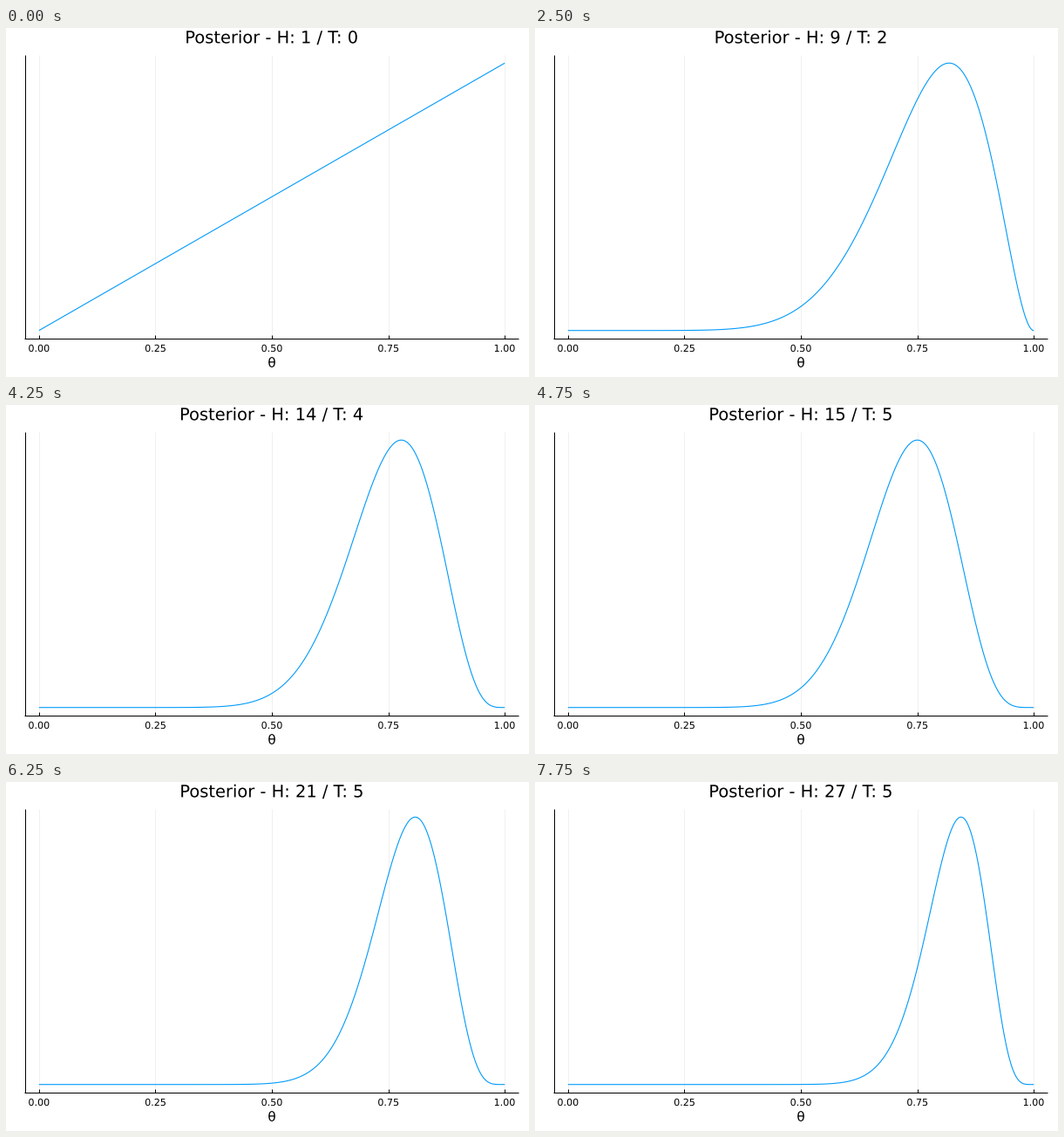
Write a matplotlib script that moves like this. It is 600 by 400 pixels and loops after 8000 ms.

```python
import numpy as np
import matplotlib.pyplot as plt
from matplotlib.animation import FuncAnimation
from matplotlib.patches import PathPatch
from matplotlib.textpath import TextPath
from matplotlib.transforms import Affine2D

W, H, DPI = 600, 400, 100
STEP_MS = 250
TOSSES = 32
TAILS = {8, 9, 15, 17, 20}  # toss numbers that land on tails

LEFT, RIGHT, TOP, BOTTOM = 21.5, 588, 31, 355.5
X0, X1 = 37.8, 572.2        # theta = 0 and theta = 1
Y0, Y1 = 346.7, 40.2        # density 0 and peak density

plt.rcParams["path.simplify"] = False
fig = plt.figure(figsize=(W / DPI, H / DPI), dpi=DPI, facecolor="white")
ax = fig.add_axes([0, 0, 1, 1])
ax.set(xlim=(0, W), ylim=(H, 0))
ax.axis("off")


def stroke(xs, ys, color="black", px=1.0, **kw):
    return ax.plot(xs, ys, color=color, lw=px * 72 / DPI,
                   solid_capstyle="butt", **kw)[0]


def text_outline(text, x, baseline, points):
    """Outline of a text centred on x, in pixel coordinates."""
    path = TextPath((0, 0), text, size=points * DPI / 72,
                    prop={"family": "DejaVu Sans"})
    box = path.get_extents()
    shift = x - (box.x0 + box.x1) / 2
    return path.transformed(Affine2D().scale(1, -1).translate(shift, baseline))


def label(text, x, baseline, points):
    path = text_outline(text, x, baseline, points)
    return ax.add_patch(PathPatch(path, facecolor="black", lw=0))


def tally(n):
    """Heads and tails after n tosses."""
    tails = sum(t <= n for t in TAILS)
    return n - tails, tails


def posterior(heads, tails):
    """Beta density over theta, scaled to a peak of one."""
    peak = heads / (heads + tails)
    top = peak ** heads * (1 - peak) ** tails
    return theta ** heads * (1 - theta) ** tails / top


for value in np.linspace(0, 1, 5):
    x = X0 + value * (X1 - X0)
    stroke([x, x], [TOP, BOTTOM], color="#f0f0f0", zorder=1)
    stroke([x, x], [BOTTOM, BOTTOM - 4], zorder=3)
    label(f"{value:.2f}", x, 371, 8)

stroke([LEFT, LEFT], [TOP, BOTTOM + 0.5], zorder=3)
stroke([LEFT - 0.5, RIGHT], [BOTTOM, BOTTOM], zorder=3)
label("θ", 305, 388.8, 11)

theta = np.linspace(0, 1, 1001)
curve = stroke(X0 + theta * (X1 - X0), np.full_like(theta, Y0),
               color="#009afa", px=1.1, zorder=4)
title = label("Posterior", 305, 17.4, 14)


def update(i):
    heads, tails = tally(i + 1)
    curve.set_ydata(Y0 + posterior(heads, tails) * (Y1 - Y0))
    title.set_path(text_outline(f"Posterior - H: {heads} / T: {tails}",
                                305, 17.4, 14))
    return curve, title


anim = FuncAnimation(fig, update, frames=TOSSES, interval=STEP_MS,
                     init_func=lambda: update(0), repeat=True, repeat_delay=0)
plt.show()
```
